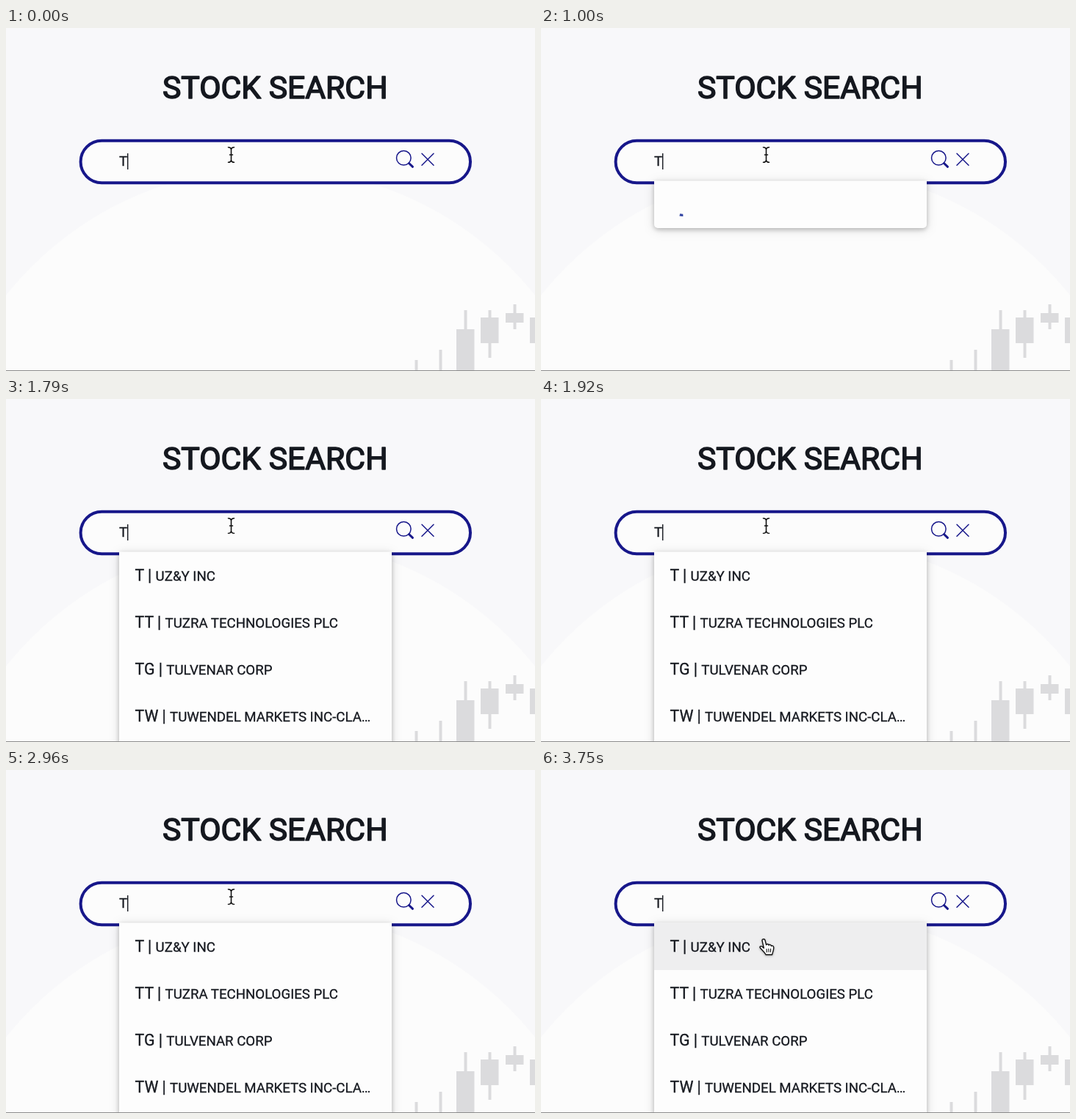
Write an HTML page that moves like this. It is 720 by 468 pixels and loops after 3790 ms.

```html
<!DOCTYPE html>
<html lang="en">
<head>
<meta charset="utf-8">
<title>Stock search</title>
<style>
  html, body { margin: 0; width: 100%; height: 100%; overflow: hidden; background: #f8f8fa; }
  svg { display: block; width: 100%; height: 100%; font-family: Roboto, sans-serif; }
  text { fill: #15181f; stroke: #15181f; stroke-width: .3px; white-space: pre; }
  .title { font-size: 42.667px; stroke-width: 1.6px; stroke-linejoin: round; }
  .panel { fill: #fdfdfd; filter: drop-shadow(0 2px 3px rgba(0, 0, 0, .22)) drop-shadow(0 2px 7px rgba(0, 0, 0, .13)); }
  .symbol { font-size: 21.333px; }
  .company { font-size: 18.667px; }
  .line { fill: none; stroke: #17178a; }
</style>
</head>
<body>
<svg viewBox="0 0 720 468">
  <rect width="720" height="468" fill="#f8f8fa"/>
  <circle cx="360" cy="651" r="460" fill="#fcfcfc"/>
  <g id="candles" fill="#dbdbdd"></g>

  <text x="366.3" y="96.3" text-anchor="middle" class="title">STOCK SEARCH</text>

  <rect x="101.6" y="153.8" width="530.4" height="57.4" rx="28.7" class="line" style="fill:#fcfcfc" stroke-width="4"/>
  <text x="154" y="188.3" class="company">T</text>
  <rect id="caret" x="165" y="171" width="1.4" height="22" fill="#15181f"/>
  <g class="line" stroke-linecap="round">
    <circle cx="541.3" cy="177.3" r="9.8" stroke-width="1.5"/>
    <path d="M548.5 184.5L553.5 189.3" stroke-width="3"/>
    <path d="M566 171.3L582 187.3M582 171.3L566 187.3" stroke-width="1.5"/>
  </g>

  <g id="loading">
    <path class="panel" d="M154 208.5H525V268a5 5 0 0 1 -5 5H159a5 5 0 0 1 -5 -5Z"/>
    <path id="arc" fill="none" stroke="#3648a4" stroke-width="3.3"/>
  </g>
  <g id="results">
    <rect class="panel" x="154" y="208.5" width="371" height="341"/>
    <rect id="hover" x="154" y="208.5" width="371" height="64.5" fill="#eeeeef"/>
  </g>

  <rect y="467" width="720" height="1" fill="#8c8c8c"/>

  <g id="beam" fill="none" stroke-linecap="round">
    <path id="beamHalo" stroke="#fff" stroke-width="3.4"/>
    <path id="beamLine" stroke="#111" stroke-width="1.6"/>
  </g>
  <g id="hand" stroke="#111" stroke-width="1.4" stroke-linejoin="round" stroke-linecap="round" style="filter:drop-shadow(0 1.5px 1.5px rgba(0,0,0,.3))">
    <path fill="#fff" d="M-2 1.6C-2.2 -.6 1.3 -1 1.9 1L3.6 7.6C4.2 6 6.4 6.2 7 8C8 6.8 9.9 7.2 10.4 9C12 8.2 13.6 9.2 13.7 11C14 15 12.2 17.5 11.6 21H3C1.2 17.2 -2.4 14.6 -4.6 11.8C-5.9 9.8 -3.6 8.6 -2 10L.3 12Z"/>
    <path fill="none" stroke-width="1.1" d="M4 13.2l.4 4.2M6.8 13l.3 4.3M9.6 13l-.1 4.2"/>
  </g>
</svg>

<script>
const LOOP = 3790, OPEN = 40, LOADED = 1790, SPIN_START = 20;
const PANEL_TOP = 209;
const $ = id => document.getElementById(id);
const show = (id, on) => $(id).setAttribute('visibility', on ? 'visible' : 'hidden');

function add(parent, tag, attrs, text = '') {
  const el = document.createElementNS('http://www.w3.org/2000/svg', tag);
  for (const key in attrs) el.setAttribute(key, attrs[key]);
  el.textContent = text;
  parent.append(el);
  return el;
}

// Candles: left, body top, body bottom, wick top, wick bottom
[
  [546, 0, 0, 453, 468],
  [579, 0, 0, 439, 468],
  [613, 411, 468, 385, 468],
  [646, 395, 430, 385, 450],
  [680, 389, 402, 377, 411],
  [713, 395, 430, 385, 385]
].forEach(([x, top, bottom, high, low]) => {
  add($('candles'), 'rect', { x: x + 10.5, y: high, width: 4, height: low - high });
  add($('candles'), 'rect', { x, y: top, width: 24.5, height: bottom - top });
});

[
  ['T', 'UZ&Y INC'],
  ['TT', 'TUZRA TECHNOLOGIES PLC'],
  ['TG', 'TULVENAR CORP'],
  ['TW', 'TUWENDEL MARKETS INC-CLA…']
].forEach(([symbol, company], i) => {
  const row = add($('results'), 'text', { x: 175.5, y: 248.3 + i * 64 });
  add(row, 'tspan', { class: 'symbol' }, symbol + ' | ');
  add(row, 'tspan', { class: 'company' }, company);
});

const beamShape = 'M-4 -10.3Q-.6 -10.3 0 -7.5Q.6 -10.3 4 -10.3M0 -7.5V7.5M-4 10.3Q-.6 10.3 0 7.5Q.6 10.3 4 10.3M-2 0H2';
$('beamHalo').setAttribute('d', beamShape);
$('beamLine').setAttribute('d', beamShape);

// cubic-bezier(.35, 0, .25, 1)
function ease(x) {
  let lo = 0, hi = 1;
  for (let i = 0; i < 24; i++) {
    const u = (lo + hi) / 2, v = 1 - u;
    if (3 * v * v * u * .35 + 3 * v * u * u * .25 + u ** 3 < x) lo = u;
    else hi = u;
  }
  return lo * lo * (3 - 2 * lo);
}

function smooth(t, from, to) {
  const u = Math.min(1, Math.max(0, (t - from) / (to - from)));
  return u * u * (3 - 2 * u);
}

// The arc grows for half a second, then shrinks from its tail, while the ring turns.
function arcPath(ms) {
  const turn = ms / 2000 * 360;
  const cycle = Math.floor(ms / 1000), phase = ms % 1000;
  let start, end;
  if (phase < 500) {
    start = turn - 90 * cycle;
    end = start + 360 * (.05 + .75 * ease(phase / 500));
  } else {
    end = turn - 72.5 - 89 * cycle;
    start = end - 360 * (.8 - .75 * ease((phase - 500) / 500));
  }
  const point = deg => {
    const a = deg * Math.PI / 180;
    return `${192.3 + 14.4 * Math.cos(a)} ${241 + 14.4 * Math.sin(a)}`;
  };
  return `M${point(start)}A14.4 14.4 0 ${end - start > 180 ? 1 : 0} 1 ${point(end)}`;
}

function draw(t) {
  const y = 173 + 58 * smooth(t, 3240, 3640);
  const over = y > PANEL_TOP;

  show('caret', t < 1020 || (t - 520) % 1000 < 500);
  show('loading', t >= OPEN && t < LOADED);
  show('results', t >= LOADED);
  show('hover', over);
  show('beam', !over);
  show('hand', over);

  $('arc').setAttribute('d', arcPath(Math.max(0, t - SPIN_START)));
  // Hiding a group also hides its arc, since neither child sets its own visibility.
  $('beam').setAttribute('transform', `translate(306.5 ${y})`);
  $('hand').setAttribute('transform', `translate(303 ${y})`);
}

const began = performance.now();
function tick() {
  draw((performance.now() - began) % LOOP);
  requestAnimationFrame(tick);
}
tick();
</script>
</body>
</html>
```
